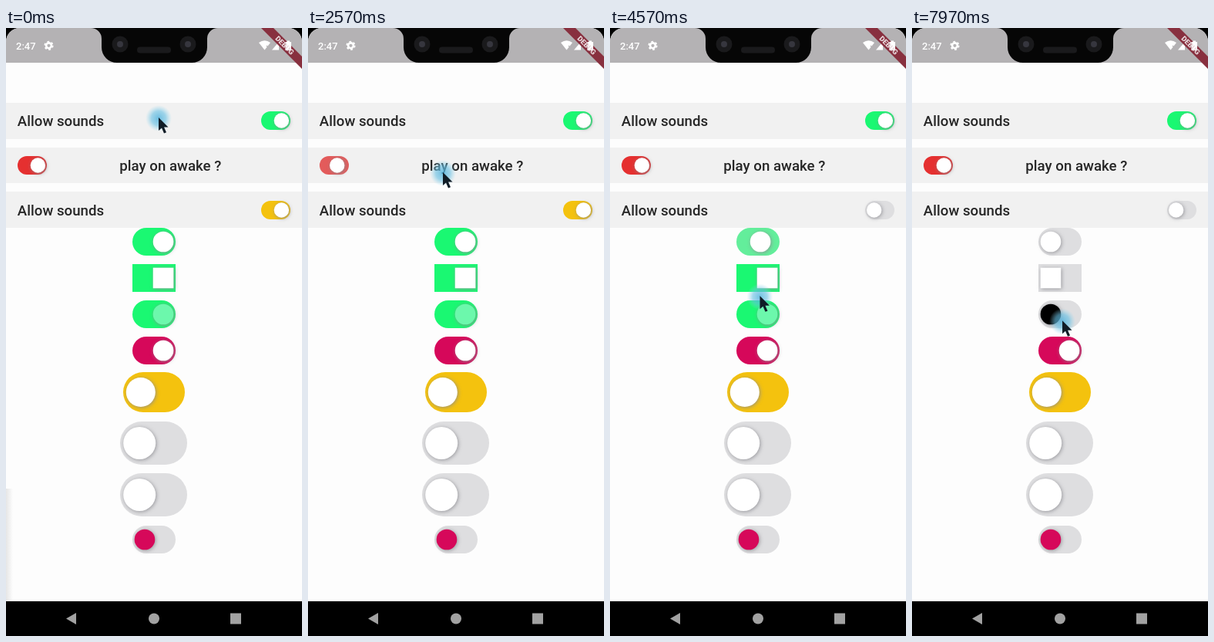
These frames come from a looping animation (384x788 px, 8 s). An HTML page:

```html
<!DOCTYPE html>
<html lang="en">
<head>
<meta charset="utf-8">
<title>Switches</title>
<style>
  html, body { margin: 0; width: 100%; height: 100%; overflow: hidden; background: #000; }
  svg { display: block; width: 100%; height: 100%; }
  text { font-family: Roboto, sans-serif; font-weight: 500; }
  .label { font-size: 18.67px; fill: #262626; }
  .thumb { filter: drop-shadow(1px 1.5px 2.5px rgba(140, 140, 144, .85)); }
</style>
</head>
<body>
<svg viewBox="0 0 384 788">
  <defs>
    <radialGradient id="glow">
      <stop offset="0" stop-color="#4bb0dc" stop-opacity=".8"/>
      <stop offset=".55" stop-color="#66c0e4" stop-opacity=".6"/>
      <stop offset="1" stop-color="#90d6ee" stop-opacity="0"/>
    </radialGradient>
    <linearGradient id="edge">
      <stop offset="0" stop-color="#e6e6e6"/>
      <stop offset="1" stop-color="#fdfdfd"/>
    </linearGradient>
    <clipPath id="screen"><path d="M0 788V18A18 18 0 0 1 18 0H366A18 18 0 0 1 384 18V788Z"/></clipPath>
  </defs>

  <rect width="384" height="788"/>
  <g clip-path="url(#screen)">
    <rect width="384" height="788" fill="#fdfdfd"/>
    <rect id="strip" y="597" width="9" height="146" fill="url(#edge)"/>
    <path d="M0 97H384V144H0ZM0 155H384V201H0ZM0 212H384V259H0Z" fill="#f1f1f1"/>
    <g class="label">
      <text x="14.800" y="126.700">Allow sounds</text>
      <text x="147.300" y="184.700">play on awake ?</text>
      <text x="14.800" y="242.700">Allow sounds</text>
    </g>
    <g id="switches"></g>

    <rect width="384" height="45" fill="#b4b2b4"/>
    <path d="M110 0A14 14 0 0 1 124 14V25A20 20 0 0 0 144 45H241A20 20 0 0 0 261 25V14A14 14 0 0 1 275 0Z" fill="#060606"/>
    <g fill="#1a1a1c">
      <circle cx="148" cy="21" r="10.500"/>
      <circle cx="236" cy="21" r="10.500"/>
      <rect x="170" y="24.500" width="44" height="8" rx="4"/>
    </g>
    <g fill="#36363e">
      <circle cx="148" cy="21" r="4"/>
      <circle cx="236" cy="21" r="4"/>
    </g>
    <g fill="#fff">
      <text x="13" y="27.600" font-size="13">2:47</text>
      <path d="M328 19Q335.500 13.500 343 19L335.500 28.500Z"/>
      <path d="M345 28.500H354V18Z"/>
    </g>
    <g fill="none" stroke="#fff">
      <circle cx="55.500" cy="22.800" r="3.400" stroke-width="2.600"/>
      <circle cx="55.500" cy="22.800" r="5.200" stroke-width="1.800" stroke-dasharray="2.700 2.745"/>
    </g>
    <path d="M338 23l4 4m0-4l-4 4" stroke="#b4b2b4" stroke-width="1.200"/>
    <path d="M331 0H347L384 37V53Z" fill="#88303f"/>
    <path d="M362.500 18H364.500V16.500H368V18H370V29H362.500Z" fill="#fff"/>
    <text transform="translate(361.600 22.400) rotate(45)" y="3.300" text-anchor="middle" font-size="9.400"
          style="font-weight:900" fill="#eadcdf">DEBUG</text>

    <rect y="743" width="384" height="45"/>
    <g fill="#a2a2a2">
      <path d="M78 765.500L91 758V773Z"/>
      <circle cx="192" cy="765.500" r="7"/>
      <rect x="291" y="758.500" width="14" height="14"/>
    </g>
  </g>

  <g id="cursor">
    <circle cy="1" r="17" fill="url(#glow)"/>
    <path d="M0 0V17L4 13.500L7 20.500L10 19.300L7 12.500H12.500Z" fill="#101c26"/>
  </g>
</svg>

<script>
const LOOP = 8000, FLIP = 220, GLIDE = 300;
const GREEN = [26, 248, 114], RED = [229, 48, 48], CRIMSON = [214, 8, 90], AMBER = [244, 194, 14];
const GREY = [222, 222, 224], WHITE = [255, 255, 255], BLACK = [0, 0, 0];

const small = (x, y, color, ...flips) => ({ x, y, w: 38, h: 24, r: 9.7, color, flips });
const medium = (row, color, more) => ({ x: 164, y: 259 + 47 * row, w: 56, h: 36, r: 13.3, color, ...more });
const large = y => ({ x: 148, y, w: 87, h: 56, r: 21, color: GREEN, on: 0 });

const switches = [
  small(331, 108, GREEN, 700, 1950),
  small(15, 166, RED, 2500, 3420),
  small(331, 224, AMBER, 4000),
  medium(0, GREEN, { flips: [4480] }),
  medium(1, GREEN, { flips: [5765], square: true }),
  medium(2, GREEN, { flips: [6570], thumb: [BLACK, [108, 248, 172]] }),
  medium(3, CRIMSON, { flips: [7110, 7730] }),
  { x: 152, y: 446, w: 80, h: 52, r: 19, color: AMBER, off: AMBER, on: 0 },
  large(510),
  large(577),
  medium(0, GREEN, { y: 645, thumb: [CRIMSON, WHITE], on: 0 })
];

// the pointer glides to each place: departure time, x, y
const glides = [
  [1770, 175, 187], [2650, 145, 178], [3400, 160, 236], [4000, 192, 280], [4440, 195, 362], [5100, 190, 328],
  [5810, 190, 371], [6580, 191, 415], [7100, 202, 473], [7350, 200, 418], [7730, 195, 379]
];

const clamp = v => Math.min(1, Math.max(0, v));
const smooth = v => v * v * (3 - 2 * v);
const easeOut = v => 1 - (1 - v) ** 3;
const mix = (a, b, k) => a + (b - a) * k;
const mixColor = (a, b, k) => `rgb(${a.map((v, i) => Math.round(mix(v, b[i], k)))})`;
const byId = id => document.getElementById(id);

function add(tag, attrs) {
  const node = document.createElementNS("http://www.w3.org/2000/svg", tag);
  for (const key in attrs) node.setAttribute(key, attrs[key]);
  return byId("switches").appendChild(node);
}

for (const s of switches) {
  const { x, y, r, w: width, h: height, square } = s;
  s.track = add("rect", { x, y, width, height, rx: square ? 0 : height / 2 });
  s.knob = add("rect", { y: y + height / 2 - r, width: 2 * r, height: 2 * r, rx: square ? 0 : r, class: "thumb" });
}

function drawSwitch({ x, w, r, track, knob, color, on = 1, off = GREY, thumb = [WHITE, WHITE], flips = [] }, t) {
  for (const start of flips) {
    on = mix(on, 1 - Math.round(on), smooth(clamp((t - start) / FLIP)));
  }
  const gap = r * 0.2;
  track.setAttribute("fill", mixColor(off, color, on));
  knob.setAttribute("fill", mixColor(...thumb, on));
  knob.setAttribute("x", mix(x + gap, x + w - gap - 2 * r, on));
}

function drawCursor(t) {
  let x = 198, y = 116;
  for (const [start, toX, toY] of glides) {
    const k = easeOut(clamp((t - start) / GLIDE));
    x = mix(x, toX, k);
    y = mix(y, toY, k);
  }
  byId("cursor").setAttribute("transform", `translate(${x} ${y})`);
}

function draw() {
  const t = performance.now() % LOOP;
  for (const s of switches) drawSwitch(s, t);
  drawCursor(t);
  byId("strip").setAttribute("opacity", t < 470 ? 1 : 0);
  requestAnimationFrame(draw);
}
draw();
</script>
</body>
</html>
```
